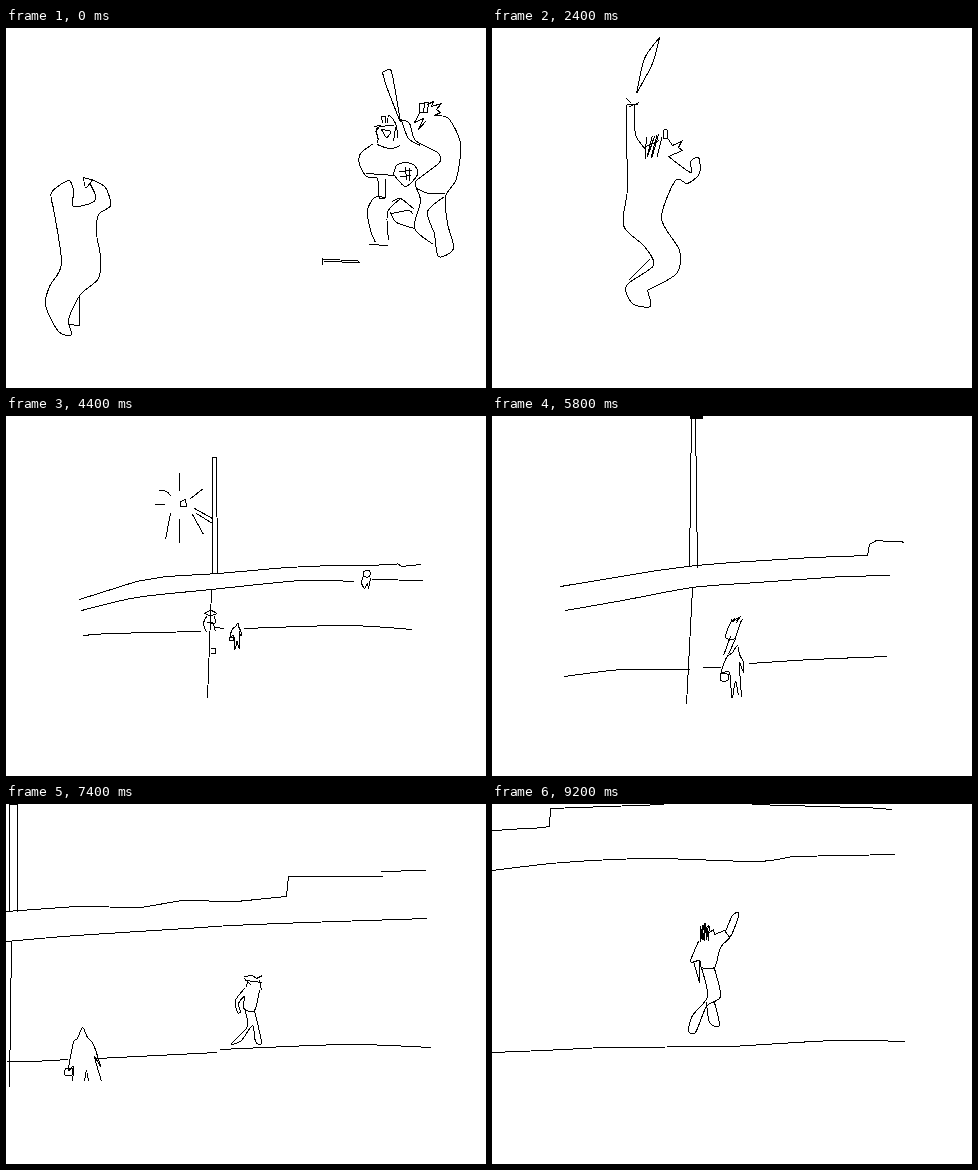
Write an HTML page that moves like this. It is 480x360 px and loops after 9.4 s.

```html
<!DOCTYPE html>
<html lang="en">
<head>
<meta charset="utf-8">
<title>Home run</title>
<style>
html, body { margin: 0; width: 100%; height: 100%; overflow: hidden; background: #fff; }
svg { display: block; width: 480px; height: 360px; }
path { fill: none; stroke: #000; stroke-width: 1; shape-rendering: crispEdges; vector-effect: non-scaling-stroke; }
</style>
</head>
<body>
<svg viewBox="0 0 480 360"><g id="stage" transform="translate(.5 .5)"></g></svg>
<script>
const LOOP = 9400, STEP = 200;
const stage = document.getElementById('stage');
const parts = [];
const NUM = /-?\d+(\.\d+)?/g;

// Adds a line drawing shown from..to. Shapes and moves are keyed by time;
// a move is [dx, dy, scale, degrees] about the pivot.
function part(from, to, shape, move, pivot = [0, 0]) {
  const el = document.createElementNS('http://www.w3.org/2000/svg', 'path');
  stage.append(el);
  parts.push({ el, from, to, shape: typeof shape === 'string' ? { 0: shape } : shape, move, pivot });
  return el;
}

function between(keys, t) {
  const times = Object.keys(keys).map(Number);
  const after = times.findIndex(k => k >= t);
  if (after < 0) return [keys[times.at(-1)], keys[times.at(-1)], 0];
  const b = times[after], a = times[Math.max(0, after - 1)];
  return [keys[a], keys[b], a === b ? 0 : (t - a) / (b - a)];
}

const mix = (a, b, p) => a + (b - a) * p;

function morph(keys, t) {
  const [a, b, p] = between(keys, t);
  if (a === b) return a;
  const goal = b.match(NUM);
  let i = 0;
  return a.replace(NUM, n => mix(+n, +goal[i++], p).toFixed(1));
}

function placed(keys, t, [px, py]) {
  const [a, b, p] = between(keys, t);
  const rest = [0, 0, 1, 0];
  const [x, y, s, r] = rest.map((v, i) => mix(a[i] ?? v, b[i] ?? v, p));
  return `translate(${x + px} ${y + py}) rotate(${r}) scale(${s}) translate(${-px} ${-py})`;
}

function shift(d, dx, dy) {
  let i = 0;
  return d.replace(NUM, n => +n + (i++ % 2 ? dy : dx));
}

// One stroke: a soft curve through its points, or straight lines after "!".
function stroke(text) {
  const n = text.match(NUM).map(Number), p = [];
  for (let i = 0; i < n.length; i += 2) p.push([n[i], n[i + 1]]);
  if (text.includes('!')) return 'M' + p.join(' ');
  const bend = (a, b, c, k) => [0, 1].map(i => a[i] + (c[i] - b[i]) * k);
  return 'M' + p[0] + p.slice(1).map((q, i) => {
    const a = p[i], before = p[i - 1] || a, next = p[i + 2] || q;
    return `C${bend(a, before, q, .14)} ${bend(q, a, next, -.14)} ${q}`;
  }).join('');
}

const path = text => text.split('/').map(stroke).join('');

// Scribbled hair
function hatch(x, y, w, h, count, slant) {
  let seed = 7;
  const rnd = () => (seed = seed * 16807 % 2147483647) / 2147483647;
  return Array.from({ length: count }, (_, i) => {
    const left = x + w * i / (count - 1);
    return `! ${left + slant * rnd()} ${y + 4 * rnd()} ${left - slant * rnd()} ${y + h - 4 * rnd()}`;
  }).join('/');
}

// Pitcher
part(0, 400, '47 180 45 164 62 152 67 162 67 178 86 174 89 167 84 156 / 77 149 85 152 79 159 77 149 / 85 151 99 159 104 177 92 186 90 205 94 228 92 250 74 266 62 291 65 306 52 303 39 277 43 258 55 235 47 180 /! 73 268 73 297 62 296',
  { 0: [0, 0], 400: [8, 2, 1, 12] }, [62, 300]);
part(600, 1400, '68 185 72 175 88 175 104 180 110 170 118 168 127 172 125 186 112 188 104 180 / 85 195 88 185 100 185 107 195 106 209 90 225 / 85 190 92 201 105 194 / 70 185 62 192 40 208 25 220 24 231 0 229 / 46 219 35 240 24 255 6 245 / 46 219 49 240 70 278 82 311 91 311 82 275 77 235 / 62 205 60 215 86 227 103 214 / 62 206 82 212 98 209 /! 88 225 104 215 117 217 /! 84 227 113 231',
  { 600: [-4, 0, 1, -8], 800: [0, 0], 1400: [2, 0, 1, 5] }, [86, 312]);

// Ball and plate
part(600, 1200, '232 144 236 140 246 140 249 145 247 149 235 148 232 144 / 246 141 244 148', { 600: [-80, 8], 800: [0, 0], 1200: [150, -8] });
part(0, 1400, '! 316 229 316 236 /! 316 231 351 232 353 234 318 233');

// Catcher
part(0, 1400, '! 368 98 374 97 369 103 372 108 / 371 110 371 99 388 97 /! 376 95 375 88 379 88 379 94 / 381 95 382 87 386 90 390 98 391 110 / 375 101 384 103 380 109 375 101 /! 389 99 387 113 / 372 110 371 116 384 120 394 117 / 367 115 354 125 353 136 360 148 371 150 372 168 379 169 379 150 /! 360 145 388 147');
part(0, 1400, '387 146 390 137 399 134 408 137 411 146 399 158 387 146 /! 393 143 406 142 /! 394 148 405 147 /! 399 139 400 152 /! 403 139 403 152 / 379 169 368 169 361 182 364 202 369 214 /! 363 216 382 217 / 382 212 381 184 394 170');
part(0, 400, '384 184 390 194 408 200 / 385 185 402 182 407 186 / 386 173 394 170 408 181');
part(600, 1400, '384 187 388 177 397 174 411 185 398 198 384 187 / 388 180 397 182 405 178 /! 391 187 398 182 /! 410 198 412 217 428 217 / 404 172 414 162 428 154');

// Batter
part(0, 400, '376 44 384 41 388 58 394 94 / 376 44 380 58 394 94', { 0: [0, 0], 400: [2, 0, 1, 8] }, [395, 93]);
part(0, 400, '394 91 403 95 409 112 431 124 433 134 410 152 410 160 / 395 92 402 110 414 117 /! 413 75 413 84 421 84 422 74 413 75 /! 418 74 417 85 /! 413 85 408 94 417 90 412 101 419 93 /! 421 76 427 73 425 78 435 75 430 81 434 84 428 87 / 428 87 442 90 454 115 450 150 439 168 441 195 447 220 432 228 428 205 / 438 165 422 165 410 160 / 438 168 421 183 428 205 / 410 160 414 173 408 200 427 216');
part(600, 1400, '! 407 41 417 41 414 65 410 90 /! 407 41 409 88',
  { 600: [0, 0], 1000: [0, 0], 1200: [0, 4, 1, -60], 1400: [0, 8, 1, -130] }, [409, 92]);
part(600, 1400, '404 90 403 98 411 96 404 90 /! 412 90 428 88 /! 420 90 426 95 /! 428 86 420 104 /! 421 88 414 100 409 104 / 409 112 403 122 410 127 422 119 428 135 428 152 / 426 94 440 95 442 104 458 122 465 140 456 163 443 183 446 212 432 227 424 210 414 178 428 152 / 440 190 441 215');

// Follow-through
const swing = { 1600: [40, 10], 2400: [0, 0], 3000: [-20, 30] };
part(1600, 3000, '134 76 134 112 135 160 131 197 152 218 161 237 134 257 140 275 158 278 155 262 / 142 76 143 106 154 122 / 171 110 171 102 175 102 175 110 171 110 /! 176 111 180 117 189 113 186 119 190 122 176 128 / 176 128 198 144 198 133 206 129 207 145 195 155 183 152 169 190 187 222 184 245 155 262 / 157 231 136 252', swing);
part(1600, 3000, hatch(154, 105, 11, 26, 6, 5) + '/! 153 118 167 112 /! 134 70 139 75 /! 147 74 137 78 /! 134 76 145 76', swing);
part(1600, 3000, '167 9 152 30 144 65 / 167 9 160 35 144 65',
  { 1600: [40, 18, 1, 120], 2200: [10, 6, 1, 15], 2400: [0, 0], 3000: [20, -90, 1, 40] }, [141, 74]);

// Outfield
part(3200, LOOP, {
  4400: '! 73 183 130 165 160 160 212 157 280 151 325 149 354 149 391 148 /! 391 147 395 150 405 149 415 148',
  5800: '! 68 170 165 154 203 149 240 146 320 141 375 139 377 128 384 124 /! 384 124 396 125 410 125 411 127',
  7400: '! 0 107 70 102 135 103 175 96 230 97 280 92 282 72 376 72 /! 374 67 390 67 400 66 419 66',
  9200: '! 0 26 20 25 30 24 40 24 50 23 57 22 58 4 172 0 /! 260 0 365 3 374 3 400 5'
});
part(3200, LOOP, {
  4400: '75 194 130 181 205 173 295 164 348 165 / 366 163 417 164',
  5800: '73 194 130 184 200 171 265 166 350 160 / 350 160 398 159',
  7400: '0 137 70 131 180 124 225 121 300 118 / 300 118 421 114',
  9200: '0 66 70 58 160 54 264 57 300 52 / 300 52 403 50'
});
part(3200, LOOP, {
  4400: '77 219 104 217 195 215 / 209 211 218 212 / 238 212 340 209 406 213',
  5800: '72 260 130 253 197 253 / 210 251 228 251 / 257 247 320 243 395 240',
  7400: '0 257 25 257 62 255 / 91 254 211 248 / 214 245 340 240 425 243',
  9200: '0 248 50 246 110 243 / 110 243 240 242 / 240 242 343 236 413 237'
});

// Light tower
const tower = '! 3 107 3 0 11 0 11 107 /! 5 138 3 283';
part(3200, 7600, {
  4400: '! 206 157 206 41 210 41 211 157 /! 205 174 201 282',
  5800: '! 197 150 199 0 203 0 205 152 /! 200 172 194 288',
  7400: tower,
  7600: shift(tower, -24, 0)
});
part(3200, 4800, '! 188 92 206 102 /! 190 97 206 107 /! 204 232 209 232 209 237 204 237');
part(5600, 6000, '! 197 1 210 1').style.strokeWidth = 3;
part(3200, 4800, '! 174 85 179 83 180 90 174 90 174 85');
part(3800, 4800, '! 173 56 173 74 /! 197 72 184 82 / 153 74 160 75 165 80 /! 148 88 158 88 / 164 97 159 123 /! 173 102 173 126 /! 186 98 197 118',
  { 3800: [0, 0, .6], 4400: [0, 0], 4800: [0, 0, 1.15] }, [177, 87]);

// Fielder
part(3200, 5000, '357 155 363 154 363 160 357 160 357 155 / 357 159 355 166 358 172 361 167 362 172 364 162',
  { 4400: [0, 0], 5000: [15, -4] });

// Base coach
const coach = '66 277 67 262 62 265 67 238 71 234 76 223 81 233 87 240 94 262 88 252 95 277 / 82 277 80 266 78 277 / 59 264 66 264 65 271 58 270 59 264';
part(3200, 8200, {
  5800: '239 282 237 256 229 256 234 241 240 236 245 229 247 238 251 246 251 256 247 247 249 281 / 246 279 243 265 240 282 / 228 257 236 258 235 264 228 264 228 257',
  7400: coach,
  8200: shift(coach, -100, 5)
}, { 4400: [-11, -49, .5], 5800: [0, 0] }, [240, 282]);

// Runner
part(3200, 4600, '198 197 204 194 210 197 204 199 198 197 / 200 200 197 207 200 216 / 208 200 209 206 205 207 / 200 206 206 206 209 215',
  { 3200: [-8, 0], 4400: [0, 0], 4600: [5, 2, 1.1] }, [203, 207]);
part(4800, 6200, hatch(239, 199, 9, 9, 6, 3) + '/ 237 208 233 221 242 222 248 206 / 238 220 231 239 / 243 222 236 238',
  { 4800: [-27, -10, .65], 5800: [0, 0], 6200: [3, -5, 1.1] }, [240, 220]);
part(6400, 8200, '238 184 229 196 231 208 234 207 232 199 238 192 237 204 248 206 253 186 / 238 204 241 222 225 239 235 236 246 221 249 237 255 238 248 206 /! 238 172 246 171 250 174 256 171 /! 239 176 256 178 /! 238 174 245 181 /! 241 176 240 183 /! 253 176 255 186',
  { 6400: [2, 6, .85], 7400: [0, 0], 8200: [-14, -6, 1.1] }, [241, 206]);

const cheer = { 8400: [10, 3, 1, 3], 9200: [0, 0] };
part(8400, LOOP, '206 137 198 157 207 156 209 163 222 163 228 143 238 132 245 115 246 108 240 111 233 127 /! 217 128 221 125 222 130 232 126 238 134 / 201 157 207 178 / 207 157 207 178 / 209 163 215 192 200 211 196 226 203 228 214 202 228 192 222 164 / 214 198 217 218 227 221 222 198', cheer, [212, 170]);
part(8400, LOOP, hatch(208, 118, 8, 20, 8, 1), cheer, [212, 170]);

function draw(now) {
  const t = Math.floor(now % LOOP / STEP) * STEP;
  for (const { el, from, to, shape, move, pivot } of parts) {
    const on = t >= from && t <= to;
    el.style.display = on ? '' : 'none';
    if (!on) continue;
    el.setAttribute('d', path(morph(shape, t)));
    if (move) el.setAttribute('transform', placed(move, t, pivot));
  }
}

const start = performance.now();
function tick() {
  draw(performance.now() - start);
  requestAnimationFrame(tick);
}
tick();
</script>
</body>
</html>
```
